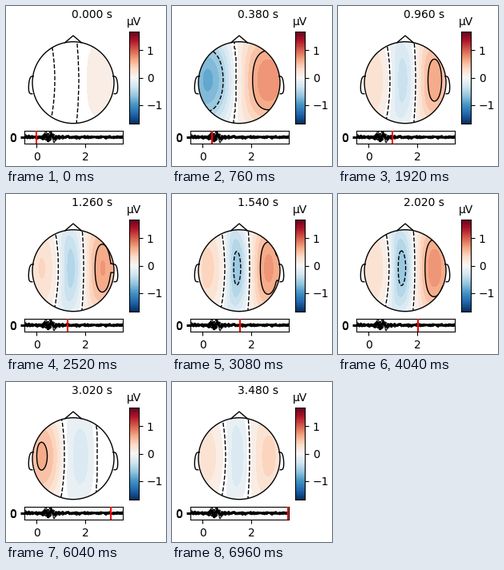
Animation of 200x200 px, one loop 7000 ms. Source, as a matplotlib script:

```python
import numpy as np
import matplotlib.pyplot as plt
from matplotlib.animation import FuncAnimation
from matplotlib.patches import Circle

SIZE, DPI = 200, 100
FRAMES, STEP_MS, DT = 175, 40, 0.02
CX, CY, R = 84, 95.7, 51
LEFT_X, RIGHT_X = 45, 121  # centres of the side lobes
VMAX = 1.68

plt.rcParams.update({"font.family": "DejaVu Sans", "font.size": 10})
fig = plt.figure(figsize=(SIZE / DPI, SIZE / DPI), dpi=DPI, facecolor="white")


def px_axes(x0, y0, x1, y1):
    """Axes whose box is given in pixels from the top left."""
    return fig.add_axes([x0 / SIZE, 1 - y1 / SIZE, (x1 - x0) / SIZE, (y1 - y0) / SIZE])


# time, left / middle / right strength, left / right zero line
POSES = np.array([
    (0.00, .03, -.03, .12, 61, 91),
    (0.38, -.85, 0, .80, 80, 81),
    (0.96, .28, -.38, .66, 65, 97),
    (1.54, .36, -.62, .73, 66, 97),
    (2.48, .24, -.63, .82, 62, 95),
    (3.02, .60, -.26, .03, 73, 114),
    (3.48, .24, -.28, .36, 67, 97),
])


def pose(t):
    i = min(np.searchsorted(POSES[:, 0], t, side="right") - 1, len(POSES) - 2)
    a, b = POSES[i], POSES[i + 1]
    s = np.clip((t - a[0]) / (b[0] - a[0]), 0, 1)
    return (a + (b - a) * (1 - np.cos(np.pi * s)) / 2)[1:]


GX, GY = np.meshgrid(np.linspace(CX - R - 1, CX + R + 1, 105),
                     np.linspace(CY - R - 1, CY + R + 1, 105))
V2 = np.clip(((GY - CY + 3) / R) ** 2, 0, 1)
BENT = GX + (5 - 3 * np.clip((GX - 60) / 35, 0, 1)) * V2


def lobe(dist, width):
    """Sine arch that rises from a zero line and sags past its peak."""
    return np.sin(np.pi / 2 * np.clip(dist / width, 0, 1.4))


def field(t):
    left, mid, right, z1, z2 = pose(t)
    z = (left * lobe(z1 - BENT, max(z1 - LEFT_X, 16))
         + mid * np.sin(np.pi * np.clip((BENT - z1) / (z2 - z1), 0, 1))
         + right * lobe(BENT - z2, max(RIGHT_X - z2, 16)))
    return z * (1 - .57 * V2)


# Head
head = px_axes(0, 0, SIZE, SIZE)
head.set(xlim=(0, SIZE), ylim=(SIZE, 0))
head.axis("off")
disc = Circle((CX, CY), R, fc="none", ec="black", lw=1, zorder=4)
head.add_patch(disc)
a = np.linspace(-np.pi / 2, np.pi / 2, 30)
ear_x = .99 + .1 * np.sqrt(np.abs(np.cos(a))) - .015 * np.sin(a)
ear_y = -.06 + .215 * np.sin(a)
nose = np.array([-.2, 0, .2]), np.array([.98, 1.15, .98])
for x, y in ((ear_x, ear_y), (-ear_x, ear_y), nose):
    head.plot(CX + R * x, CY - R * y, color="black", lw=1, zorder=4)
clock = head.text(107.2, 15, "", ha="center", va="baseline")
head.text(160, 24, "µV", ha="center", va="baseline")

# Colour scale
bar = px_axes(154, 32, 166, 147)
bar.imshow(np.linspace(-1, 1, 256)[:, None], cmap="RdBu_r", aspect="auto",
           origin="lower", extent=(0, 1, -VMAX, VMAX))
bar.set_xticks([])
bar.yaxis.tick_right()
bar.set_yticks([-1, 0, 1])

# Signal traces
trace = px_axes(23, 156, 146, 172)
rng = np.random.default_rng(4)
ts = np.linspace(-.5, 3.54, 240)
env = .13 + .36 * np.exp(-((ts - .5) / .28) ** 2) + .14 * np.exp(-((ts + .4) / .2) ** 2)
for _ in range(12):
    wave = sum(rng.normal() * np.sin(2 * np.pi * f * ts + rng.uniform(0, 6.28))
               for f in rng.uniform(.8, 5, 5))
    trace.plot(ts, np.clip(env * wave / 1.6, -.85, .85), color="black", lw=.8)
trace.set(xlim=(-.5, 3.52), ylim=(-1, 1), xticks=[0, 2])
trace.set_yticks([-.08, 0, .08], ["0"] * 3)
cursor = trace.axvline(0, color="red", lw=1.5, zorder=5)

# Bands with a white middle; lines up to zero are dashed
BANDS = 27
EDGES = np.linspace(-VMAX, VMAX, BANDS + 1)
COLORS = plt.get_cmap("RdBu_r")((np.arange(BANDS) + .5) / BANDS)
COLORS[BANDS // 2] = 1
LINES = np.arange(-2, 3) * VMAX / 3
STYLES = ["dashed"] * 3 + ["solid"] * 2
drawn = []


def update(n):
    while drawn:
        drawn.pop().remove()
    t = n * DT
    z = field(t)
    fill = head.contourf(GX, GY, z, levels=EDGES, colors=COLORS, zorder=1)
    lines = head.contour(GX, GY, z, levels=LINES, colors="black",
                         linewidths=1, linestyles=STYLES, zorder=2)
    for c in (fill, lines):
        c.set_clip_path(disc)
        drawn.append(c)
    clock.set_text(f"{t:.3f} s")
    cursor.set_xdata([t, t])


anim = FuncAnimation(fig, update, frames=FRAMES, interval=STEP_MS,
                     init_func=lambda: None, repeat=True, repeat_delay=0)
plt.show()
```
